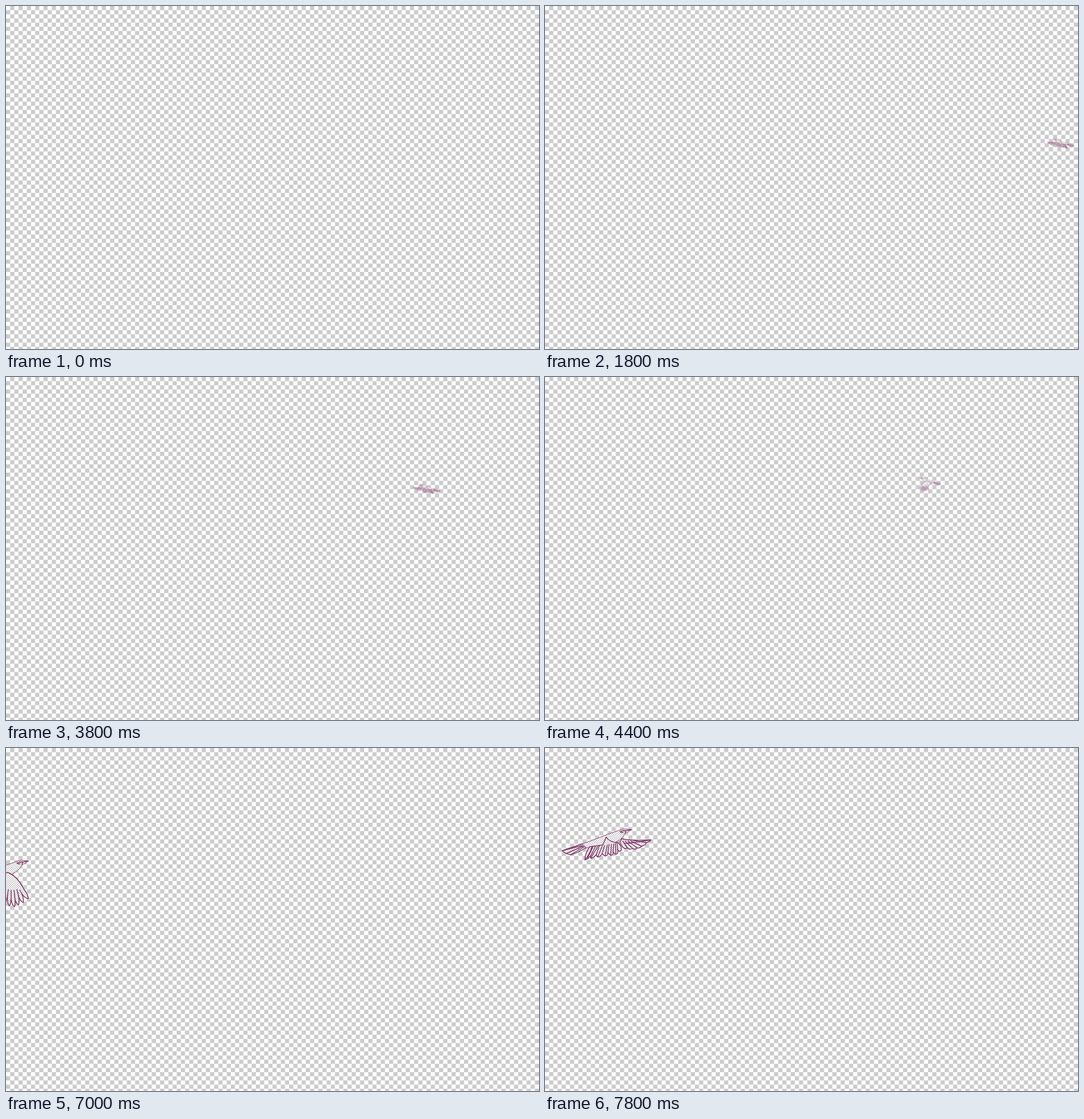
Animation of 932x601 px, one loop 8000 ms. Source, as an HTML page without scripts:

```html
<!DOCTYPE html>
<html lang="en">
<head>
<meta charset="utf-8">
<title>Bird in flight</title>
<style>
  html, body { margin: 0; width: 100%; height: 100%; overflow: hidden; background: #fff; }
  svg { display: block; width: 932px; height: 601px; }

  .bird { stroke: #7d3163; stroke-width: 1.4; stroke-linejoin: round; stroke-linecap: round; }
  .small { stroke-width: 1.7; }
  .skin { fill: url(#fine); }
  .thin { stroke-width: .9; }
  .line { fill: none; }

  .entry, .away, .back, .back use { opacity: 0; animation: 8s step-end infinite; }
  .entry { animation-name: entry; }
  .away { animation-name: away; }
  .back { animation-name: back; }

  /* wing beat: up, level, down, level */
  .away use { opacity: 0; animation: .8s step-end infinite; }
  .away .up { animation-name: beat-up; }
  .away .level { animation-name: beat-level; }
  .away .down { animation-name: beat-down; }

  .back .up { animation-name: back-up; }
  .back .level { animation-name: back-level; }
  .back .down { animation-name: back-down; }

  @keyframes beat-up { 0% { opacity: 1 } 25%, 100% { opacity: 0 } }
  @keyframes beat-level { 0%, 50% { opacity: 0 } 25%, 75% { opacity: 1 } 100% { opacity: 0 } }
  @keyframes beat-down { 0% { opacity: 0 } 50% { opacity: 1 } 75%, 100% { opacity: 0 } }

  @keyframes back-down { 0% { opacity: 0 } 87.5% { opacity: 1 } 90%, 100% { opacity: 0 } }
  @keyframes back-up { 0% { opacity: 0 } 92.5% { opacity: 1 } 95%, 100% { opacity: 0 } }
  @keyframes back-level { 0%, 92.5% { opacity: 0 } 90%, 95%, 100% { opacity: 1 } }

  @keyframes entry { 0% { opacity: 0 } 12.5% { opacity: 1 } 17.5%, 100% { opacity: 0 } }

  @keyframes away {
    0% { opacity: 0; transform: translate(906px, 242px); }
    17.5% { opacity: 1; transform: translate(906px, 242px); animation-timing-function: steps(2); }
    22.5% { opacity: 1; transform: translate(889px, 233.5px); animation-timing-function: steps(3); }
    30% { opacity: 1; transform: translate(856px, 223px); animation-timing-function: steps(2); }
    35% { opacity: 1; transform: translate(826px, 204px); animation-timing-function: steps(5); }
    47.5% { opacity: 1; transform: translate(723px, 188.5px); animation-timing-function: steps(5); }
    60% { opacity: 1; transform: translate(610px, 168px); }
    62.5%, 100% { opacity: 0; transform: translate(610px, 168px); }
  }

  @keyframes back {
    0% { opacity: 0; transform: translate(39px, 198px); }
    87.5% { opacity: 1; transform: translate(39px, 198px); animation-timing-function: steps(4); }
    97.5%, 100% { opacity: 1; transform: translate(151px, 143px); }
  }
</style>
</head>
<body>
<svg viewBox="0 0 932 601" aria-label="A bird flying over a checkered ground">
  <defs>
    <pattern id="check" width="14.5625" height="14.5625" patternUnits="userSpaceOnUse">
      <path fill="#cbcbcb" d="M7.28 0h7.2825v7.28h-7.2825zM0 7.28h7.28v7.2825h-7.28z"/>
    </pattern>
    <pattern id="fine" width="4" height="4" patternUnits="userSpaceOnUse">
      <path fill="#fff" d="M0 0h4v4h-4z"/>
      <path fill="#cbcbcb" d="M0 0h2v2h-2zM2 2h2v2h-2z"/>
    </pattern>

    <!-- every pose has the tip of the beak at 0,0 -->
    <g id="body">
      <path class="skin" d="M-86 25L-121 37Q-114 43 -106 44Q-94 41 -78 31Z"/>
      <path class="line" d="M-121 37L-86 28M-114 42L-84 29M-106 44L-82 30"/>
      <path class="skin thin" d="M-86 25C-65 18 -42 8 -21 1Q-14 -2 -8 -1L0 0Q-5 4 -10 6L-17 15Q-28 25 -46 29L-78 32Z"/>
      <path class="line" d="M-20 4Q-14 1 -10 2L0 0M-10 2L-11 6M-18 5l4 0"/>
    </g>

    <g id="level">
      <path class="skin" d="M-17 16Q0 20 34 18Q31 22 26 23Q24 28 18 29Q15 33 10 32Q6 36 2 33Q-3 36 -7 32Q-13 35 -16 29L-20 22Z"/>
      <path class="line" d="M26 23L4 19M18 29L-1 20M10 32L-6 20M2 33L-11 20M-7 32L-15 20M-13 24Q0 24 34 18"/>
      <use href="#body"/>
      <path class="skin" d="M-44 13Q-39 22 -23 23Q-16 29 -18 37Q-22 39 -24 35Q-22 43 -27 43Q-31 42 -32 38Q-31 45 -36 45Q-40 43 -41 40Q-41 46 -46 46Q-50 44 -51 42Q-54 48 -59 48Q-62 46 -61 43Q-66 50 -71 50Q-72 47 -70 44Q-75 52 -81 53Q-82 44 -73 30L-50 27Z"/>
      <path class="line" d="M-81 53Q-72 42 -69 30M-77 51L-67 30M-70 44L-63 30M-71 50L-59 30M-61 43L-56 28M-59 48L-51 29M-51 42L-47 28M-46 46L-42 27M-41 40L-39 26M-36 45L-35 26M-32 38L-31 25M-27 43L-28 24M-24 35L-25 24"/>
    </g>

    <g id="down">
      <use href="#body"/>
      <path class="skin" d="M-36 20Q-19 27 -8 49Q0 59 0 66Q-7 65 -12 56Q-7 68 -9 73Q-16 69 -18 57Q-15 71 -17 77Q-24 73 -24 59Q-22 74 -24 80Q-31 76 -30 60Q-30 74 -33 79Q-38 73 -36 58Q-38 72 -42 76Q-46 70 -43 55Q-47 66 -52 69Q-54 62 -50 49Q-62 42 -68 28Z"/>
      <path class="line" d="M-12 56L-15 51M-18 57L-20 50M-24 59L-25 51M-30 60L-30 51M-36 58L-35 50M-43 55L-40 48M-50 49L-45 44"/>
    </g>

    <g id="up">
      <path class="skin" d="M-24 10Q2 -18 31 -31Q28 -22 22 -19Q23 -13 15 -10Q14 -4 7 -2Q5 4 -2 5Q-6 12 -17 15Z"/>
      <path class="line" d="M22 -19L-6 1M15 -10L-9 5M7 -2L-12 9"/>
      <use href="#body"/>
      <path class="skin" d="M-31 17Q-19 -4 -19 -35L-16 -62Q-24 -56 -26 -43Q-25 -55 -28 -60Q-35 -52 -34 -38Q-36 -49 -40 -54Q-45 -44 -42 -31Q-46 -42 -51 -46Q-55 -35 -49 -23Q-56 -33 -61 -35Q-62 -25 -55 -14Q-61 -21 -67 -22Q-66 -9 -58 0L-64 20Z"/>
      <path class="line" d="M-26 -43L-27 -18M-34 -38L-33 -15M-42 -31L-39 -11M-49 -23L-45 -6M-55 -14L-50 1M-58 0L-53 7"/>
    </g>
  </defs>

  <rect width="932" height="601" fill="#fff"/>
  <rect width="932" height="601" fill="url(#check)"/>

  <g class="bird small entry">
    <use href="#level" transform="translate(924 250) scale(-.297 .297)"/>
  </g>

  <g class="bird small away">
    <g transform="scale(-.297 .297)">
      <use class="up" href="#up"/>
      <use class="level" href="#level"/>
      <use class="down" href="#down"/>
    </g>
  </g>

  <g class="bird back">
    <use class="up" href="#up"/>
    <use class="level" href="#level"/>
    <use class="down" href="#down"/>
  </g>
</svg>
</body>
</html>
```
